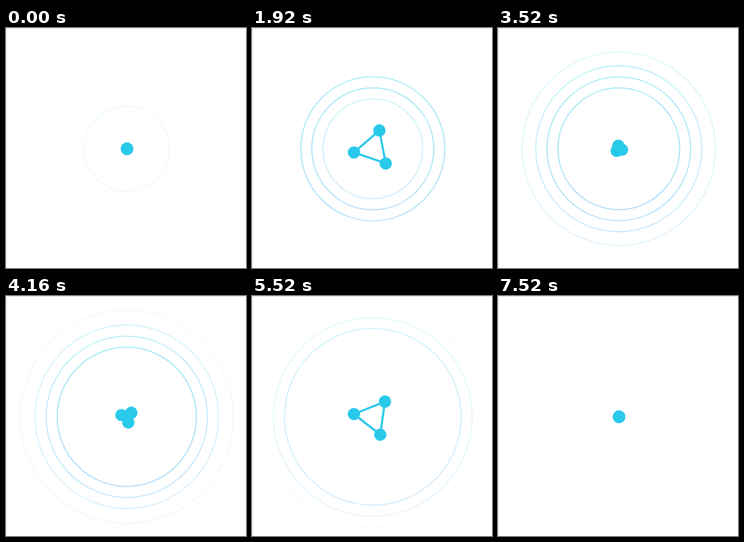
Recreate the animation shown at these times as an HTML page. Size 300 by 300 pixels, loop 7.6 s.

```html
<!DOCTYPE html>
<html lang="en">
<head>
<meta charset="utf-8">
<title>Pulse</title>
<style>
  html, body { margin: 0; width: 100%; height: 100%; overflow: hidden; background: #fff; }
  svg { display: block; width: 100vw; height: 100vh; }
  .ring { fill: none; stroke: url(#tint); stroke-width: 1.3; }
  .links { fill: none; stroke: #29c9ea; stroke-width: 2.6; stroke-linejoin: round; }
  .dot { fill: #29c9ea; }
  .edge { fill: none; stroke: #e4e4e4; }
</style>
</head>
<body>
<svg id="stage" viewBox="0 0 300 300">
  <defs>
    <linearGradient id="tint" x1="0" y1="0" x2="0" y2="1">
      <stop offset="0" stop-color="#2cd2e6"/>
      <stop offset="1" stop-color="#4fb0f4"/>
    </linearGradient>
  </defs>
  <path class="edge" d="M.5 300V.5H300"/>
</svg>
<script>
const LOOP = 7600, STEP = 80, SPIN = 3.8, PULSE = 3.71;
const RINGS = [
  { start: 0, speed: 19.3 },
  { start: 0.57, speed: 17.2 },
  { start: 1.38, speed: 17.2 },
  { start: 2.18, speed: 17.2 }
];
// Ring opacity by radius
const FADE = [[48, 0], [76, 0.5], [88, 0.46], [103, 0.33], [121, 0.18], [137, 0.06], [144, 0]];

const stage = document.getElementById('stage');

function add(tag, cls, attrs) {
  const el = document.createElementNS('http://www.w3.org/2000/svg', tag);
  el.setAttribute('class', cls);
  set(el, attrs);
  return stage.appendChild(el);
}

function set(el, attrs) {
  for (const key in attrs) el.setAttribute(key, attrs[key]);
}

function fade(r) {
  for (let i = 1; i < FADE.length; i++) {
    const [r0, a0] = FADE[i - 1], [r1, a1] = FADE[i];
    if (r >= r0 && r < r1) return a0 + (a1 - a0) * (r - r0) / (r1 - r0);
  }
  return 0;
}

const rings = RINGS.map(() => add('circle', 'ring', { cx: 151, cy: 151 }));
const links = add('polygon', 'links', {});
const dots = [0, 1, 2].map(() => add('circle', 'dot', { r: 7.7 }));

function draw(t) {
  rings.forEach((ring, i) => {
    const r = 53 + RINGS[i].speed * (t - RINGS[i].start);
    set(ring, { r: Math.max(r, 0), opacity: fade(r) });
  });

  const beat = t % SPIN;
  const spread = beat < PULSE ? 24.3 * Math.sin(Math.PI * beat / PULSE) : 0;
  const turn = -9 - 360 * beat / SPIN;
  const points = dots.map((dot, i) => {
    const a = (turn + 120 * i) * Math.PI / 180;
    const x = 151.3 + spread * Math.cos(a);
    const y = 151 + spread * Math.sin(a);
    set(dot, { cx: x, cy: y });
    return x + ',' + y;
  });
  set(links, { points: points.join(' ') });
}

const begin = performance.now();
function tick() {
  const ms = (performance.now() - begin) % LOOP;
  draw(Math.floor(ms / STEP) * STEP / 1000);
  requestAnimationFrame(tick);
}
tick();
</script>
</body>
</html>
```
